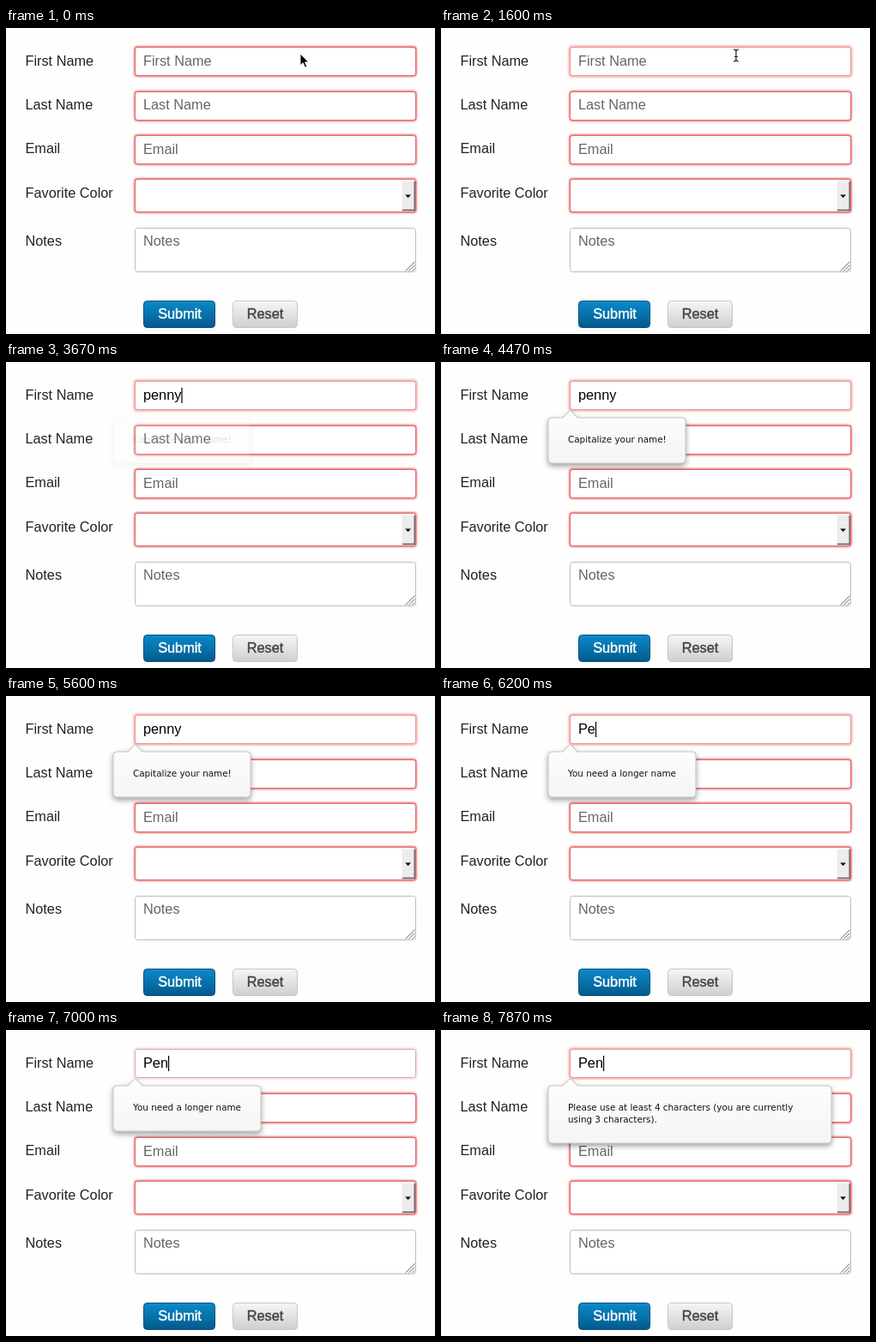
An HTML page for the animation above (8 s loop, 500x357 px).

```html
<!DOCTYPE html>
<html lang="en">
<head>
<meta charset="utf-8">
<title>Form validation</title>
<style>
html, body { margin: 0; width: 100%; height: 100%; overflow: hidden; background: #fefefe; }
svg { display: block; width: 500px; height: 357px; }
text { font: 16.3px "Liberation Sans", Arial, sans-serif; fill: #222; white-space: pre; }
.hint { fill: #666; }
.typed { fill: #000; }
.medium { stroke-width: .45px; text-anchor: middle; }
.tip { font: 10.4px "DejaVu Sans", sans-serif; fill: #111; }
</style>
</head>
<body>
<svg viewBox="0 0 500 357" xmlns="http://www.w3.org/2000/svg">
  <defs>
    <linearGradient id="blue" x2="0" y2="1"><stop stop-color="#0a8aca"/><stop offset="1" stop-color="#035a8c"/></linearGradient>
    <linearGradient id="grey" x2="0" y2="1"><stop stop-color="#f6f6f6"/><stop offset="1" stop-color="#cfcfd0"/></linearGradient>
    <linearGradient id="panel" x2="0" y2="1"><stop stop-color="#fdfdfd"/><stop offset="1" stop-color="#f5f5f6"/></linearGradient>
    <filter id="tight" x="-5%" y="-30%" width="110%" height="160%"><feGaussianBlur stdDeviation=".8"/></filter>
    <filter id="wide" x="-5%" y="-40%" width="110%" height="180%"><feGaussianBlur stdDeviation="1.8"/></filter>
    <filter id="drop" x="-20%" y="-30%" width="140%" height="180%"><feDropShadow dx="0" dy="3" stdDeviation="3.2" flood-opacity=".38"/></filter>
  </defs>
  <rect width="500" height="357" fill="#fefefe"/>
  <g id="labels"></g>
  <g id="fields"></g>
  <rect id="mark" x="160" y="29" width="44.4" height="20" fill="#b4d5fe"/>
  <text id="value" class="typed" x="160" y="44.3"></text>
  <rect id="caret" y="30" width="1.2" height="18"/>
  <g id="select">
    <rect x="461" y="178.5" width="15.5" height="34.5" fill="#ececee"/>
    <path d="M461.5 213V179H476" fill="none" stroke="#f7f7f7"/>
    <path d="M462 212.5H476.2V179" fill="none" stroke="#55565a" stroke-width="1.3"/>
    <path d="M465.2 194.5h6.8l-3.4 3.8z" fill="#111"/>
  </g>
  <path d="M465.5 283.5l11-11M469.5 283.5l7-7M473.5 283.5l3-3" stroke="#777" fill="none"/>
  <rect x="160.5" y="318.5" width="83" height="31" rx="4" fill="url(#blue)" stroke="#07507c"/>
  <text class="medium" x="202.5" y="339.3" style="fill:#fff;stroke:#fff">Submit</text>
  <rect x="264.5" y="318.5" width="75" height="31" rx="4" fill="url(#grey)" stroke="#c6c6c8"/>
  <text class="medium" x="302" y="339.3" style="fill:#444;stroke:#444">Reset</text>
  <g id="popup">
    <path id="bubble" fill="url(#panel)" stroke="#b4b4b6" stroke-width=".8" filter="url(#drop)"/>
    <text id="tip1" class="tip" x="148" y="94"></text>
    <text id="tip2" class="tip" x="148" y="108"></text>
  </g>
  <path id="arrow" d="M343 30v13.6l3.2-2.9 2.3 5.3 2.3-1-2.3-5.1h4.2z" stroke="#fff" stroke-width=".9"/>
  <path id="beam" d="M341 25.2q2.6 0 2.9 1.8v10.2q-.3 1.8-2.9 1.8M346.9 25.2q-2.6 0-3 1.8M346.9 39q-2.6 0-3-1.8M342 33.5h4" fill="none" stroke="#222" stroke-width="1.2"/>
</svg>
<script>
const LOOP = 8000;
const $ = id => document.getElementById(id);
const show = (el, on) => el.setAttribute("visibility", on ? "visible" : "hidden");
const fade = (el, a) => el.setAttribute("opacity", a);

// label, top, height, label baseline, hint baseline, hint, required
const rows = [
  ["First Name", 22.5, 33, 44, 44.3, "First Name", true],
  ["Last Name", 74.5, 33, 95, 95.3, "Last Name", true],
  ["Email", 125.5, 33, 146, 147, "Email", true],
  ["Favorite Color", 176.5, 38, 198, 0, "", true],
  ["Notes", 233.5, 51, 254, 254, "Notes", false]
];

const box = (y, h, grow, attrs) =>
  `<rect x="${150.5 - grow}" y="${y - grow}" width="${327 + 2 * grow}" height="${h + 2 * grow}" rx="${3 + grow / 2}" ${attrs}/>`;
const plain = (y, h) => box(y, h, 0, 'fill="#fff" stroke="#bcbcc2"');
const invalid = (y, h) => box(y, h, .9, 'fill="#f22f2f" filter="url(#tight)"')
  + box(y, h, 0, 'fill="#fff" stroke="#d9706e"');
const focused = (y, h) => box(y, h, 1.4, 'fill="#f58f8b" filter="url(#wide)"')
  + box(y, h, 0, 'fill="#fff" stroke="#e79a97"');

rows.forEach(([label, y, h, base, hintBase, hint, required], i) => {
  $("labels").innerHTML += `<text x="22.5" y="${base}">${label}</text>`;
  const frame = i === 0
    ? `${plain(y, h)}<g id="idle">${invalid(y, h)}</g><g id="focus">${focused(y, h)}</g>`
    : required ? invalid(y, h) : plain(y, h);
  $("fields").innerHTML += frame + `<text id="hint${i}" class="hint" x="160" y="${hintBase}">${hint}</text>`;
});

// each entry: start time, value
const typing = [
  [0, ""], [2400, "p"], [2600, "pe"], [2730, "pen"], [2930, "penn"], [3130, "penny"],
  [6000, "P"], [6200, "Pe"], [6500, "Pen"], [6670, "Peny"], [7000, "Pen"]
];
const tips = [
  [0, [160, 53, "Capitalize your name!", ""]],
  [6070, [172, 53, "You need a longer name", ""]],
  [7070, [330, 67, "Please use at least 4 characters (you are currently", "using 3 characters)."]]
];
const caretOn = [[1070, 1570], [2200, 3930], [4500, 5070], [6000, 6670], [7000, 7330], [7870, LOOP]];

const at = (list, t) => list.filter(e => e[0] <= t).pop()[1];
const within = (t, a, b) => t >= a && t < b;
const ramp = (t, a, b) => Math.min(1, Math.max(0, (t - a) / (b - a)));

function bubble(w, h) {
  const r = 4;
  return `M${125 + r} 65H142L150.5 56.5L159 65H${125 + w - r}q${r} 0 ${r} ${r}v${h - 2 * r}q0 ${r} ${-r} ${r}`
    + `H${125 + r}q${-r} 0 ${-r} ${-r}V${65 + r}q0 ${-r} ${r} ${-r}z`;
}

function draw(t) {
  const text = at(typing, t);
  $("value").textContent = text;
  show($("hint0"), !text);
  show($("mark"), within(t, 5700, 6000));
  show($("caret"), caretOn.some(([a, b]) => within(t, a, b)));
  $("caret").setAttribute("x", 160 + (text ? $("value").getComputedTextLength() : 0));

  show($("idle"), t < 1070);
  fade($("focus"), t < 1070 ? 0 : t < 7000 ? 1 - ramp(t, 6640, 6730) : ramp(t, 6960, 7060));

  const [w, h, line1, line2] = at(tips, t);
  $("bubble").setAttribute("d", bubble(w, h));
  $("tip1").textContent = line1;
  $("tip2").textContent = line2;
  fade($("popup"), t < 3670 ? 0 : .12 + .88 * ramp(t, 3670, 3930));

  show($("arrow"), t < 330);
  show($("beam"), within(t, 330, 2400));
}

const start = performance.now();
function tick() {
  draw((performance.now() - start) % LOOP);
  requestAnimationFrame(tick);
}
draw(0);
requestAnimationFrame(tick);
</script>
</body>
</html>
```
